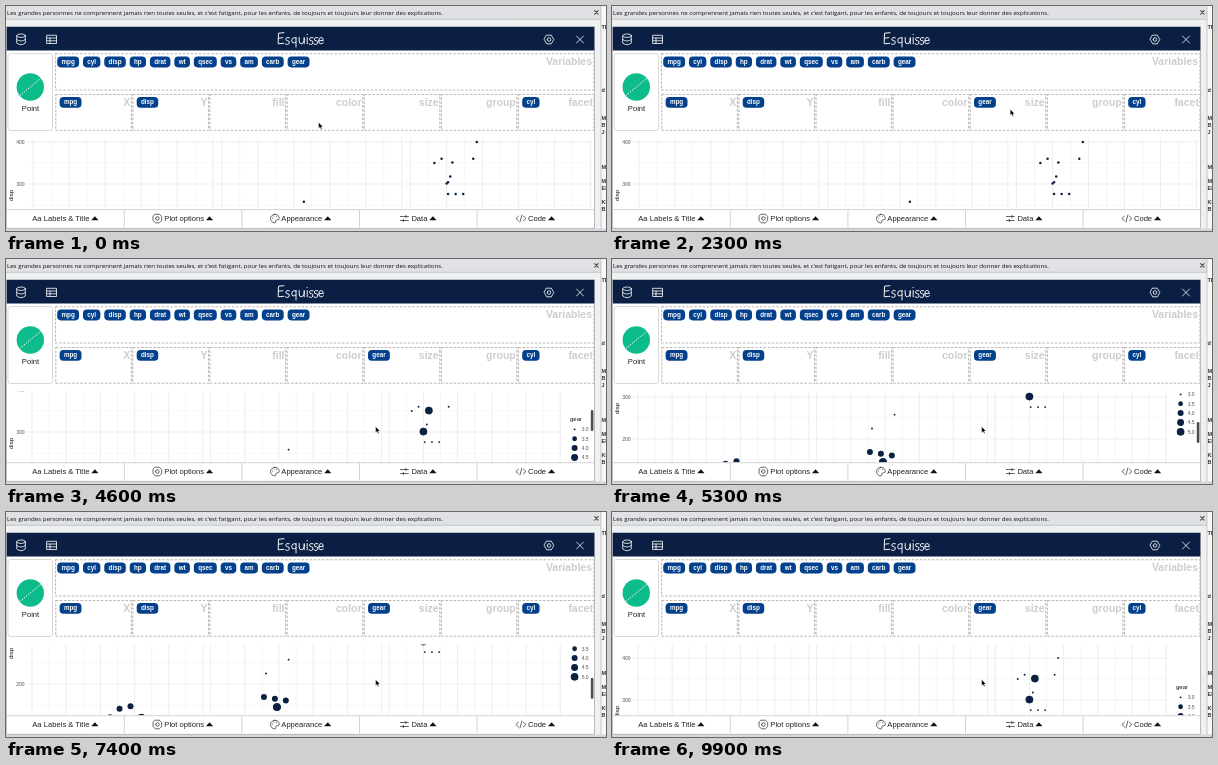
Recreate the animation shown at these times as an HTML page. Size 600 by 225 pixels, loop 10 s.

```html
<!DOCTYPE html>
<html lang="fr">
<head>
<meta charset="utf-8">
<title>Esquisse</title>
<style>
  html, body { margin: 0; width: 100%; height: 100%; overflow: hidden; }
  svg { display: block; width: 600px; height: 225px; }
  text { font-family: "Liberation Sans", Arial, sans-serif; }
  .line { fill: none; stroke-linecap: round; stroke-linejoin: round; }
  .caption { font: 500 6.130px "Open Sans", sans-serif; fill: #111; }
  .chip { font-size: 6.300px; font-weight: bold; fill: #fff; }
  .zone { font-size: 10.500px; font-weight: bold; fill: #cdcdcd; text-anchor: end; }
  .dash { fill: none; stroke: #b9b9b9; stroke-width: 1.100; stroke-dasharray: 2.600 1.500; }
  .menu { font-size: 7.600px; fill: #222; }
  .tick { font-size: 5px; fill: #4d4d4d; }
  .title { font-size: 6px; fill: #111; }
  .behind { font-size: 5.500px; font-weight: bold; fill: #333; }
  .middle { text-anchor: middle; }
  .end { text-anchor: end; }
</style>
</head>
<body>
<svg viewBox="0 0 600 225">
  <defs>
    <clipPath id="view"><path d="M0 132.500H588.500V203.500H0z"/></clipPath>
    <path id="s" d="M3.500 .3Q0 -.5 0 1.500T2 3.400 3.300 5.700 -.3 6.500"/>
    <path id="cog" d="M-2.300 -4.300H2.300L4.800 0 2.300 4.300H-2.300L-4.800 0zM-1.800 0a1.800 1.800 0 1 0 3.600 0a1.800 1.800 0 1 0 -3.600 0"/>
  </defs>

  <!-- windows -->
  <path fill="#f8f8f8" d="M0 0H600V225H0z"/>
  <g id="behind"></g>
  <path fill="#eef1f1" d="M0 12H595V225H0z"/>
  <path fill="#e0e1e4" d="M0 0H595V13H0z"/>
  <path fill="none" stroke="#bcbcbc" stroke-width=".8" d="M0 13.300H595M595 0V225"/>
  <text x="1" y="8.800" class="caption">Les grandes personnes ne comprennent jamais rien toutes seules, et c'est fatigant, pour les enfants, de toujours et toujours leur donner des explications.</text>
  <path class="line" stroke="#444" stroke-width="1.100" d="M588.700 4.700l3.400 3.400m0-3.400l-3.400 3.400"/>
  <path fill="#fff" d="M0 44H588.500V222H0z"/>
  <path fill="#d3d8df" d="M0 222.500H600V225H0z"/>
  <path fill="none" stroke="#aaa" stroke-width=".8" d="M.4 20.500V222.300H588.500V20.500"/>

  <!-- header -->
  <path fill="#0a1f43" d="M.8 20.700H588.300V44.500H.8z"/>
  <g class="line" stroke="#fff" stroke-width=".8">
    <ellipse cx="15" cy="29.700" rx="4.300" ry="1.700"/>
    <path d="M10.700 29.700V37q4.300 3.400 8.600 0V29.700M10.700 33.500q4.300 3.300 8.600 0"/>
    <path d="M41 29.300H50.500V37.500H41zM41 32H50.500M41 34.800H50.500M44 32V37.500"/>
    <use href="#cog" x="543" y="33.500"/>
    <path d="M570.500 30l7 7m0-7l-7 7"/>
    <g role="img" aria-label="Esquisse" stroke-width=".95">
      <path d="M278 26.700L272.500 27.200 272.200 37.800 277.800 37.300M272.500 32.200L276.800 31.700"/>
      <path d="M290 32q-4.200-1.200-4.200 2.700t4.200 1.200M290 31.500V41M293.200 31.500v3.500q0 2.800 2 2.800t3-3v-3.300v6.300M301.200 31.500v6.300M301.200 28.400v.3M313 34.600h4.300q0-3.100-2.200-3.100t-2.300 3.200 2 3.100 2.700-1"/>
      <use href="#s" x="279.800" y="31.400"/><use href="#s" x="303.500" y="31.400"/><use href="#s" x="308.300" y="31.400"/>
    </g>
  </g>

  <!-- chart type and drop zones -->
  <rect x="2" y="47.500" width="44.500" height="77" rx="2.500" fill="#fff" stroke="#d4d4d4" stroke-width=".9"/>
  <circle cx="24.300" cy="81" r="13.700" fill="#0cbc8b"/>
  <path class="line" stroke="#fff" stroke-dasharray=".5 2" d="M14.500 89L34.500 72.500"/>
  <text x="24.500" y="105" class="menu middle">Point</text>
  <g id="zones"></g>

  <!-- plot -->
  <g clip-path="url(#view)">
    <g id="plain"></g>
    <g id="sized"></g>
  </g>
  <rect id="thumb" x="584.800" width="2.600" height="21" rx="1.300" fill="#4c4c4c"/>

  <!-- bottom menu -->
  <path fill="#fff" d="M1 203.500H588V221.500H1z"/>
  <path fill="none" stroke="#cfcfcf" stroke-width=".9" d="M1 203.700H588"/>
  <g id="menu"></g>

  <g id="dragged" opacity=".85"></g>
  <path id="arrow" d="M0 0V6.200L1.500 5 2.500 7.300 3.600 6.800 2.700 4.600H4.600z" stroke="#fff" stroke-width=".5"/>
  <path id="hand" d="M-2.600 -1.500q.6-1.600 1.500-.7q.9-1.300 1.600-.1q1-.9 1.500.3q1.200-.3 1.100 1.200q0 2.200-1.300 4H-1.500q-2.300-3-1.100-4.700z" fill="#b9c9dc" stroke="#111" stroke-width=".9"/>
</svg>

<script>
const LOOP = 10000, FRAME = 100;
const INK = '#0b2142';
const byId = id => document.getElementById(id);

function add(parent, tag, attrs, label) {
  const node = document.createElementNS('http://www.w3.org/2000/svg', tag);
  for (const key in attrs) node.setAttribute(key, attrs[key]);
  if (label !== undefined) node.textContent = label;
  parent.append(node);
  return node;
}

function write(parent, label, x, y, style) {
  return add(parent, 'text', { x, y, class: style }, label);
}

// A chip is as wide as its label plus padding
function chip(parent, label, left, y) {
  const padding = 4.3;
  const node = add(parent, 'g', {});
  const box = add(node, 'rect', { x: left, y: y - 5.4, height: 10.8, rx: 3.8, fill: '#04418c' });
  const width = write(node, label, left + padding, y + 1.9, 'chip').getComputedTextLength() + 2 * padding;
  box.setAttribute('width', width);
  return { node, width };
}

'TR,,,,,,,,,d,,,,M,B,J,,,,,ME,,ME,EB,,KB,B'.split(',')
  .forEach((label, row) => write(byId('behind'), label, 595.5, 23 + 7 * row, 'behind'));

// Variables and aesthetics
const zones = byId('zones');
add(zones, 'rect', { x: 49.5, y: 47.8, width: 538.5, height: 36.2, class: 'dash' });
write(zones, 'Variables', 586, 59.2, 'zone');
let left = 51.2;
for (const name of ['mpg', 'cyl', 'disp', 'hp', 'drat', 'wt', 'qsec', 'vs', 'am', 'carb', 'gear'])
  left += chip(zones, name, left, 56).width + 3.9;

const mapped = {};
[['X', 'mpg'], ['Y', 'disp'], ['fill'], ['color'], ['size', 'gear'], ['group'], ['facet', 'cyl']].forEach(([label, name], i) => {
  const x = 49.8 + 77.1 * i;
  add(zones, 'rect', { x, y: 88.5, width: 75.6, height: 35.8, class: 'dash' });
  write(zones, label, x + 74.5, 99.8, 'zone');
  if (name) mapped[label] = chip(zones, name, x + 3.8, 96.4).node;
});
chip(byId('dragged'), 'gear', -6.5, 0);

// Bottom menu: icon, label and caret centred in equal cells
const icons = {
  'Labels & Title': '',
  'Plot options': 'M-2 -4.300H2L4.300 -2V2L2 4.300H-2L-4.300 2V-2zM-1.800 0a1.800 1.800 0 1 0 3.600 0a1.800 1.800 0 1 0 -3.600 0',
  'Appearance': 'M.5 -4.200a4.300 4.300 0 1 0 0 8.600c1.800 0 .3-2.300 1.500-2.900s2.900.3 2.900-1.700a4.300 4.300 0 0 0-4.400-4zM-1.700 -.5v.2M-.5 -2.500v.2M2.200 -2.200v.2',
  'Data': 'M-4 -2H4M-4 2H4M1.500 -3.200v2.400M-1 .8v2.400',
  'Code': 'M-2.500 -2.300L-5 0-2.500 2.300M2.500 -2.300L5 0 2.500 2.300M1 -3.500L-1 3.500'
};
const menu = byId('menu');
Object.entries(icons).forEach(([label, d], i) => {
  const center = 60.6 + 117.6 * i;
  const half = write(menu, label, center, 215.3, 'menu middle').getComputedTextLength() / 2;
  const caret = center + half + 5.5, icon = center - half - 7;
  add(menu, 'path', { d: `M${caret - 3.6} 214.200l3.600 -3.900l3.600 3.900z`, fill: '#111' });
  if (d) add(menu, 'path', { d, class: 'line', stroke: '#333', 'stroke-width': 0.75, transform: `translate(${icon} 212.500)` });
  else write(menu, 'Aa', icon, 215.3, 'menu middle');
  if (i) add(menu, 'path', { d: `M${117.6 * i + 0.7} 204V221.500`, stroke: '#cfcfcf', 'stroke-width': 0.9 });
});

// Cars lie along short trends: cylinder panel, gears, count, first and last [mpg, disp]
const cars = [];
function trend(panel, gear, count, [mpg, disp], [lastMpg, lastDisp]) {
  for (let i = 0; i < count; i++) {
    const k = i / (count - 1);
    cars.push({ panel, gear, mpg: mpg + (lastMpg - mpg) * k, disp: disp + (lastDisp - disp) * k });
  }
}
trend(0, 4, 2, [21.4, 121], [24.4, 147]);
trend(0, 4, 2, [22.8, 108], [22.8, 141]);
trend(0, 4, 4, [27.6, 79], [34, 73]);
trend(0, 5, 2, [26, 120], [30.4, 95]);
trend(1, 4, 3, [17.8, 169], [21, 161]);
trend(1, 3, 2, [18.1, 225], [21.4, 258]);
trend(1, 5, 2, [19.7, 145], [19.7, 145]);
trend(2, 3, 3, [15.2, 276], [17.3, 276]);
trend(2, 3, 2, [15.2, 304], [15.5, 318]);
trend(2, 3, 2, [13.3, 350], [14.3, 360]);
trend(2, 3, 2, [18.7, 360], [19.2, 400]);
trend(2, 5, 2, [15, 301], [15.8, 351]);

const gearRadius = gear => 0.95 + 2.9 * Math.sqrt((gear - 3) / 2);
const yOf = disp => 314 - 0.42 * disp;

function drawPlot(parent, origin, pitch, perMpg, radius) {
  const xOf = (mpg, panel) => origin + pitch * panel + perMpg * (mpg - 10);
  const grid = (d, major) => add(parent, 'path', { d, stroke: '#e9e9e9', 'stroke-width': major ? 0.8 : 0.4 });
  for (let panel = 0; panel < 3; panel++) {
    for (let disp = 100; disp <= 450; disp += 50)
      grid(`M${xOf(9.2, panel)} ${yOf(disp)}H${xOf(35.1, panel)}`, disp % 100 === 0);
    for (let mpg = 10; mpg <= 35; mpg += 2.5) {
      const x = xOf(mpg, panel), major = mpg % 5 === 0;
      grid(`M${x} ${yOf(492)}V${yOf(51)}`, major);
      if (major) write(parent, mpg, x, 299.3, 'tick middle');
    }
  }
  for (const { panel, gear, mpg, disp } of cars)
    add(parent, 'circle', { cx: xOf(mpg, panel), cy: yOf(disp), r: radius(gear), fill: INK });
  for (let disp = 100; disp <= 400; disp += 100)
    write(parent, disp, 18.5, yOf(disp) + 1.8, 'tick end');
  write(parent, 'disp', 0, 0, 'title middle').setAttribute('transform', 'translate(6.500 199.500) rotate(-90)');
  write(parent, 'mpg', 288, 307, 'title middle');
}

const plain = byId('plain'), sized = byId('sized');
drawPlot(plain, 27, 188.8, 7.2, () => 1.25);
drawPlot(sized, 26, 178.6, 6.84, gearRadius);
write(sized, 'gear', 564, 177, 'title');
for (let gear = 3; gear <= 5; gear += 0.5) {
  const y = 185.4 + 18.7 * (gear - 3);
  add(sized, 'circle', { cx: 568.6, cy: y, r: gearRadius(gear), fill: INK });
  write(sized, gear.toFixed(1), 575.7, y + 1.8, 'tick');
}

// Motion
const GRAB = 600, HOVER = 1200, DROP = 1700, REDRAW = 3500;
const pointerStart = { x: 312.5, y: 116.3 };
const pointerMoves = [
  { from: 0, to: 500, x: 288.5, y: 56 },
  { from: 700, to: 1300, x: 411, y: 104 },
  { from: DROP, to: 2500, x: 397.3, y: 102.6 },
  { from: REDRAW, to: 4100, x: 369.5, y: 167.5 }
];
const clamp = (value, low, high) => Math.max(low, Math.min(high, value));

// Each move bends: x eases out while y eases in
function pointerAt(time) {
  let { x, y } = pointerStart;
  for (const move of pointerMoves) {
    const k = clamp((time - move.from) / (move.to - move.from), 0, 1);
    x += (move.x - x) * k * (2 - k);
    y += (move.y - y) * k * k;
  }
  return [x, y];
}

// Down at 50 px/s to the end of the page, then back up
function scrollAt(time) {
  const down = 10 + 0.05 * Math.max(0, time - 4500);
  const up = 0.0725 * (8200 - time);
  return Math.max(0, Math.min(down, 100, up));
}

const show = (node, visible) => node.setAttribute('display', visible ? 'inline' : 'none');
const place = (node, x, y) => node.setAttribute('transform', `translate(${x} ${y})`);

function render(time) {
  const scroll = scrollAt(time);
  const dragging = time >= GRAB && time < DROP;

  for (const id of ['dragged', 'hand', 'arrow']) {
    place(byId(id), ...pointerAt(time));
    show(byId(id), dragging === (id !== 'arrow'));
  }
  show(mapped.size, time >= HOVER);
  mapped.size.setAttribute('opacity', dragging ? 0.3 : 1);

  show(plain, time < REDRAW);
  show(sized, time >= REDRAW);
  place(plain, 0, -scroll);
  place(sized, 0, -scroll);

  byId('thumb').setAttribute('y', 146 + 0.34 * scroll);
  byId('thumb').setAttribute('opacity', time < 4500 ? 0 : clamp((9000 - time) / 300, 0, 1));
}

function tick() {
  render(Math.floor(performance.now() % LOOP / FRAME) * FRAME);
  requestAnimationFrame(tick);
}
tick();
</script>
</body>
</html>
```
